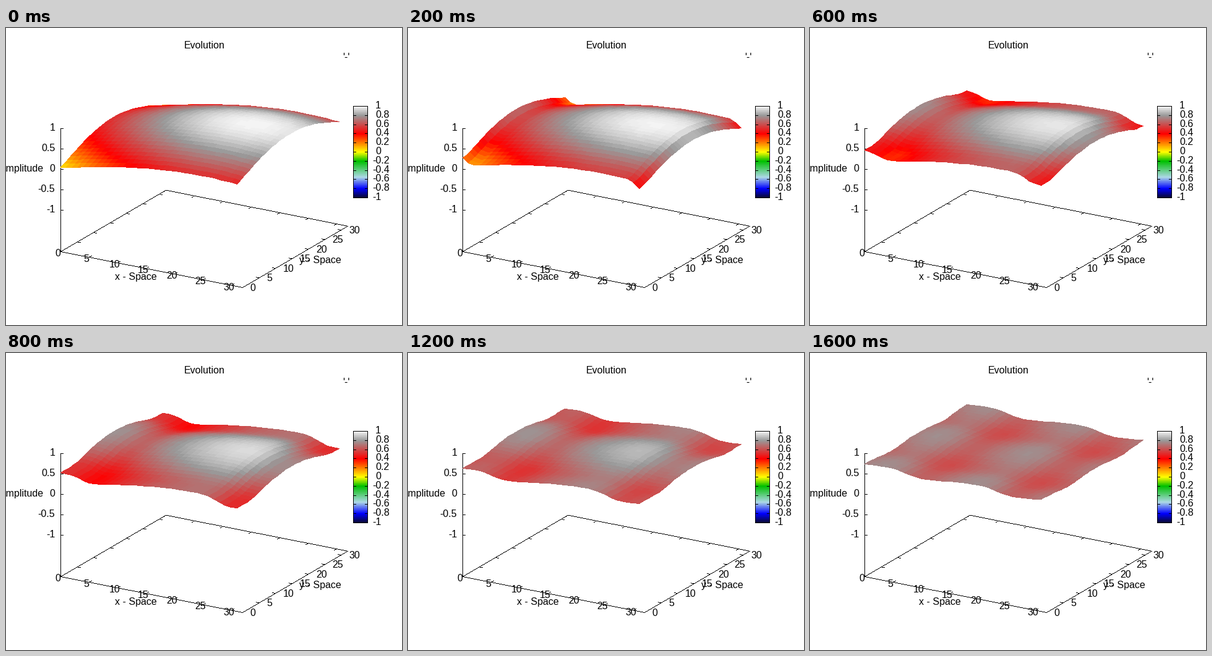
Animation, 640 px wide and 480 px high, one loop 1700 ms. Source, as a matplotlib script:

```python
import numpy as np
import matplotlib.pyplot as plt
from matplotlib.animation import FuncAnimation
from matplotlib.collections import PolyCollection
from matplotlib.colors import LinearSegmentedColormap

W, H, DPI = 640, 480, 80
PX = 72 / DPI          # points per pixel
N = 32                 # grid points per side
FRAMES = 17

STOPS = [(-1, "#0a0a30"), (-0.8, "#0000ff"), (-0.55, "#add8e6"),
         (-0.2, "#00c000"), (0, "#ffff00"), (0.4, "#ff0000"),
         (0.8, "#999999"), (1, "#f4f4f4")]
cmap = LinearSegmentedColormap.from_list(
    "relief", [((v + 1) / 2, c) for v, c in STOPS], N=256)

fig = plt.figure(figsize=(W / DPI, H / DPI), dpi=DPI, facecolor="white")
ax = fig.add_axes([0, 0, 1, 1])
canvas = np.ones((H, W, 3))    # holds the crisp one-pixel lines


def project(x, y, z):
    """Grid position and amplitude to stage pixels."""
    u, v = x / N, y / N
    return (88 + 294 * u + 170 * v,
            361 + 58 * u - 99.3 * v - 66.5 * (z + 2))


def line(*pts):
    """Stepped polyline without smoothing."""
    for (x0, y0), (x1, y1) in zip(pts, pts[1:]):
        n = int(round(max(abs(x1 - x0), abs(y1 - y0)))) + 1
        cols = np.round(np.linspace(x0, x1, n)).astype(int)
        rows = np.round(np.linspace(y0, y1, n)).astype(int)
        canvas[rows, cols] = 0


def tick(p, dx, dy):
    line(p, (p[0] + dx, p[1] + dy))


def label(x, y, s, ha="center"):
    ax.text(x - 0.8, y + 4.9, s, ha=ha, va="baseline",
            family="Liberation Sans", size=16 * PX, color="black", zorder=4)


def draw_frame():
    corners = [(0, 0), (N, 0), (N, N), (0, N), (0, 0)]
    line(*[project(x, y, -2) for x, y in corners])
    line((88, 361), (88, 162))
    for k in range(7):
        s = 5 * k
        tick(project(s, 0, -2), 4, -2.4)
        tick(project(s, N, -2), -4, 2.4)
        tick(project(0, s, -2), 5, 1)
        tick(project(N, s, -2), -5, -1)
        label(84.3 + 46 * k, 363.5 + 9.1 * k, str(s))
        label(395 + 26.6 * k, 419.5 - 15.5 * k, str(s), "left")
    for z in (1, 0.5, 0, -0.5, -1):
        y = round(project(0, 0, z)[1])
        tick((88, y), 4, 0)
        label(79.5, y - 1, f"{z:g}", "right")
    label(320.5, 27.3, "Evolution")
    label(550.5, 46.3, "'-'")
    label(25.5, 226.5, "Amplitude")
    label(210.5, 401.5, "x - Space")
    label(508.5, 374.5, "y - Space")


def draw_colorbar():
    x0, x1, top, bottom = 561, 584, 126, 274
    ramp = np.linspace(1, 0, bottom - top + 1)
    canvas[top:bottom + 1, x0:x1 + 1] = cmap(ramp)[:, None, :3]
    line((x0, top), (x1, top), (x1, bottom), (x0, bottom), (x0, top))
    for k in range(11):
        v = (5 - k) / 5
        y = round(top + 14.8 * k)
        tick((x0, y), 4, 0)
        tick((x1, y), -4, 0)
        label(593 if v < 0 else 597.4, y - 1, f"{v:g}", "left")


def spread(profile):
    """Split a periodic profile into two waves moving half a cell per step."""
    right, left = profile / 2, profile / 2
    out = []
    for _ in range(FRAMES):
        out.append(right + left)
        right = (right + np.roll(right, 1)) / 2
        left = (left + np.roll(left, -1)) / 2
    return out


grid = np.arange(N)
centre = (grid + 0.5) / N
waves_x = spread(0.5 * np.sin(2 * centre))
waves_y = spread(0.5 * np.sin(3 * centre))
gx, gy = np.meshgrid(grid, grid)


def cell_corners(a):
    """Four corner values of each cell, ordered from back to front."""
    a = a[::-1]
    quad = [a[:-1, :-1], a[:-1, 1:], a[1:, 1:], a[1:, :-1]]
    return np.stack([q.ravel() for q in quad], axis=1)


surface = PolyCollection([], antialiaseds=False, edgecolors="none",
                         linewidths=0, zorder=3)
ax.add_collection(surface, autolim=False)


def update(i):
    z = waves_y[i][:, None] + waves_x[i][None, :]
    px, py = project(gx, gy, z)
    verts = np.stack([cell_corners(px), cell_corners(py)], axis=2)
    surface.set_verts(np.round(verts))
    surface.set_facecolor(cmap((cell_corners(z).mean(axis=1) + 1) / 2))
    return [surface]


draw_frame()
draw_colorbar()
ax.imshow(canvas, extent=(-0.5, W - 0.5, H - 0.5, -0.5), aspect="auto",
          interpolation="nearest", zorder=0)
ax.set_xlim(-0.5, W - 0.5)
ax.set_ylim(H - 0.5, -0.5)
ax.axis("off")

anim = FuncAnimation(fig, update, frames=FRAMES, interval=100,
                     repeat=True, repeat_delay=0, blit=False)
plt.show()
```
